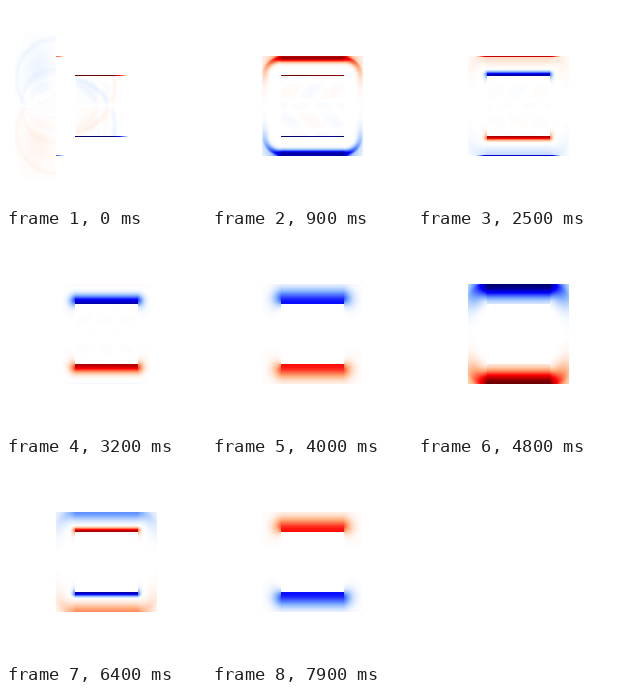
These frames come from a looping animation (200x200 px, 8 s). A matplotlib script:

```python
import numpy as np
import matplotlib.pyplot as plt
from matplotlib.animation import FuncAnimation
from matplotlib.colors import LinearSegmentedColormap

SIZE, FRAMES, STEP = 200, 80, 100
HALF_PERIOD = 3900
WALL = 20

CMAP = LinearSegmentedColormap.from_list("field", [
    (0, "#000030"), (.25, "#0000ff"), (.4, "#78aaff"), (.5, "#ffffff"),
    (.6, "#ffaa78"), (.75, "#ff0000"), (1, "#300000")], N=513)

# Upper half only; the lower half is its negative mirror.
y, x = np.mgrid[0:SIZE // 2, 0:SIZE].astype(float)
cols = np.arange(SIZE)
u = np.maximum(np.abs(x - 100) - 31, 0)   # sideways from the hole
v = 70 - y                                # upwards from the hole
hole = (v <= 0) & (u == 0)
wall = (y >= 50) & (u < WALL) & ~hole
dist = np.hypot(u, np.maximum(v - 1, 0))
depth = np.minimum(dist, WALL)

# The current turns the corner and dies out along the side walls.
turn = .5 + .5 * np.tanh((v - 2) / (4 + u / 2))
weight = np.where(u > 0, turn * np.exp(-u / 14), 1) * wall
weight *= np.exp(-np.maximum(dist - WALL, 0) / 10)


def ease(t, start, end):
    s = np.clip((t - start) / (end - start), 0, 1)
    return s * s * (3 - 2 * s)


def bump(offset, width):
    return np.exp(-(offset / width) ** 2)


def pulse(age):
    """Band that forms on the inner face, widens and leaves outwards."""
    centre = WALL * ease(age, 1900, 2900)
    width = 3 + 9 * ease(age, 300, 2200) - 4 * ease(age, 2900, 4600)
    amp = 1.4 * ease(age, -200, 500)
    amp += -.45 * ease(age, 1000, 2000) + .75 * ease(age, 2000, 2800)
    amp *= 1 - ease(age, 2800, 5300)
    return amp * bump(depth - centre, width)


def entry(t):
    """First band, moving in from the outer face with a steep back."""
    centre = WALL - 7 * ease(t, 300, 1800)
    width = np.where(depth > centre, 2.5, 2 + 3 * ease(t, 200, 1500))
    amp = 1.5 * ease(t, 0, 700) * (1 - ease(t, 1400, 2400))
    return amp * bump(depth - centre, width)


def arc(cx, cy, r, width):
    """Soft circular wavefront, odd about the horizontal axis."""
    def ring(yy):
        return bump(np.hypot(x - cx, yy - cy) - r, width)
    return ring(y) - ring(SIZE - 1 - y)


def incoming_wave():
    left = (x > 8) & (x < 50) & (y > 25)
    wash = .05 * bump(x - 32, 15) * bump(y - 65, 28)
    wash += .03 * arc(50, 72, 40, 2.5) + .02 * arc(48, 95, 32, 2)
    inside = .05 * arc(60, 120, 48, 3) + .03 * arc(58, 112, 36, 3)
    inside += .02 * bump(x - 90, 22) * bump(y - 84, 12)
    return -wash * left - inside * ((x > 69) & (x < 125) & (v <= 0))


wave = incoming_wave()
ripple = hole * np.sin(x / 7 + y / 9) * np.sin(y / 6)


def inner_line(t):
    """Thin sheet on the inner face: sweeps right, then flips sign."""
    front = np.clip((122 + t * .3 - cols) / 16, 0, 1)
    first = 1.7 * front * (1 - ease(t, 800, 1600))
    second = 1.3 * ease(t, 800, 1600) * (1 - ease(t, 1600, 2400))
    sheet = first + second * np.tanh((100 - cols) / 8)
    return sheet * ((cols >= 69) & (cols <= 131))


def outer_line(t):
    """Thin sheet on the outer face, seen on arrival and once more later."""
    reach = 58 + 88 * ease(t, 0, 250)
    amp = .6 * (1 - ease(t, 300, 1500)) + 1.1 * bump(t - 2500, 350)
    ends = np.clip((reach - cols) / 6, 0, 1) * (cols >= 50)
    return amp * ends * (1 - ease(np.abs(cols - 100), 30, 44) * ease(t, 0, 250))


def field(t):
    bands = entry(t) + pulse(t - 2000 - HALF_PERIOD) - pulse(t - 2000)
    bands += .35 * ease(t, 1500, 2400) * pulse(t - 2000 + HALF_PERIOD)
    top = bands * weight + wave * np.exp(-t / 250)
    top += .05 * ripple * ease(t, 0, 300) * np.exp(-t / 1500)
    top[69] += inner_line(t)
    top[50] += outer_line(t)
    return np.vstack([top, -top[::-1]])


fig = plt.figure(figsize=(2, 2), dpi=100, facecolor="white")
ax = fig.add_axes([0, 0, 1, 1])
ax.axis("off")
image = ax.imshow(field(0), cmap=CMAP, vmin=-2, vmax=2,
                  interpolation="nearest", aspect="auto")


def update(i):
    image.set_data(field(i * STEP))
    return [image]


anim = FuncAnimation(fig, update, frames=FRAMES, interval=STEP,
                     repeat=True, repeat_delay=0, blit=False)
plt.show()
```
